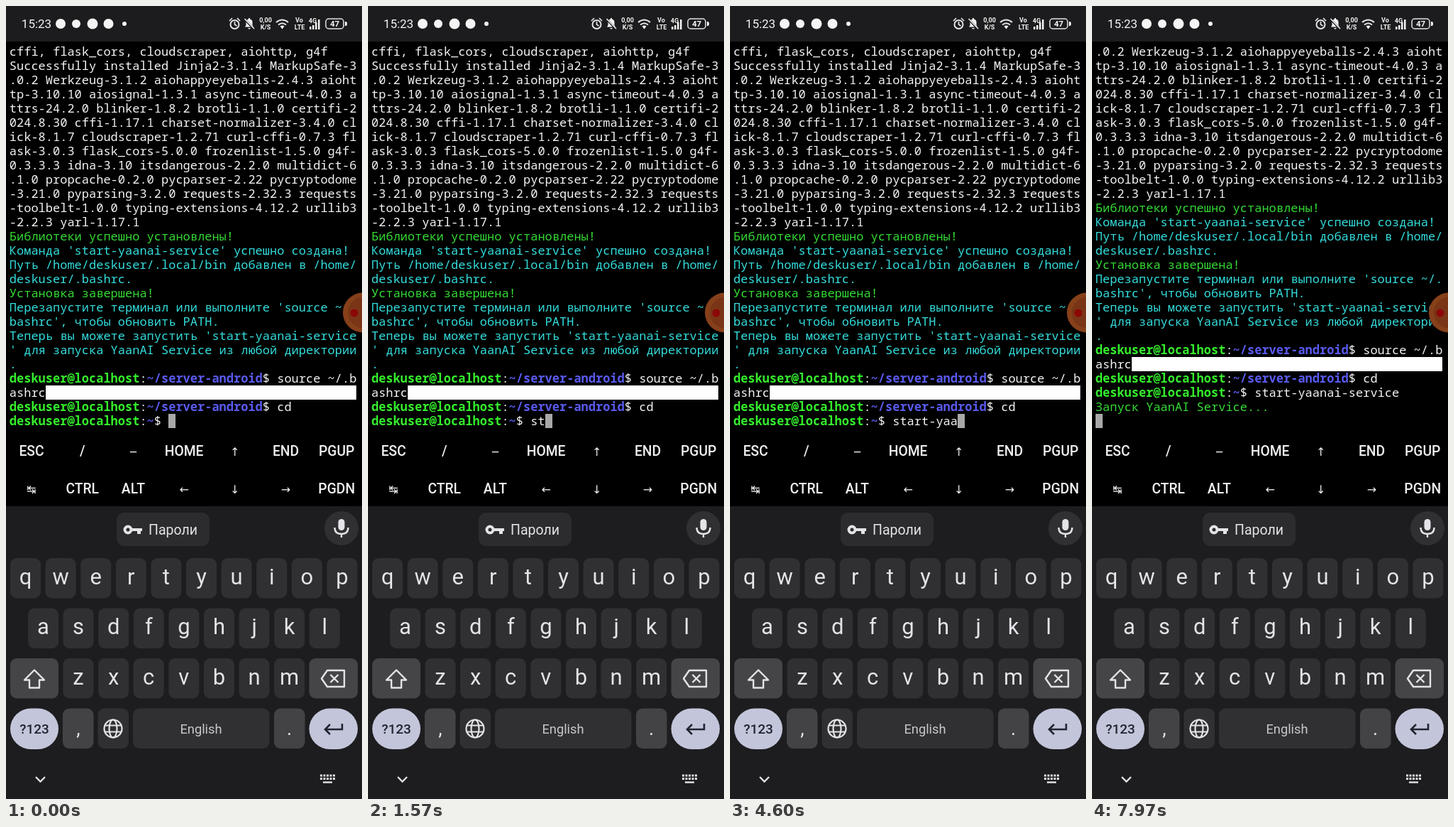
An HTML page for the animation above (8 s loop, 502 px wide and 1116 px high).

```html
<!DOCTYPE html>
<html lang="ru">
<head>
<meta charset="utf-8">
<style>
html, body { margin: 0; width: 100%; height: 100%; overflow: hidden; background: #000; }
svg, pre { position: absolute; left: 0; top: 0; }
svg { font-family: Roboto, sans-serif; fill: #e4e4e8; }
svg text { text-anchor: middle; }
pre { left: 4.8px; top: 53.6px; margin: 0; color: #f4f4f4;
  font: 17px/20px "Noto Sans Mono", monospace; font-variant-ligatures: none; }
pre div { height: 20px; white-space: pre; }
.green { color: #35dc35; }
.cyan { color: #35dede; }
.user { color: #35ee2c; font-weight: 700; }
.path { color: #5a5af0; font-weight: 700; }
.bar, .cursor { display: inline-block; height: 20px; vertical-align: top; background: #fff; }
.cursor { background: #a8a8a8; }
.line { fill: none; stroke: #e4e4e8; stroke-width: 2.4; }
</style>
</head>
<body>
<pre id="term"></pre>
<svg width="502" height="1116" viewBox="0 0 502 1116">
  <rect width="502" height="50" fill="#1c1c1e"/>
  <rect y="704" width="502" height="412" fill="#1d1d20"/>

  <!-- status bar -->
  <g fill="#f4f4f4">
    <text x="43" y="31" font-size="17">15:23</text>
    <circle cx="77" cy="25" r="7"/><circle cx="99" cy="25" r="6"/>
    <circle cx="122" cy="25" r="7.5"/><circle cx="144.500" cy="25" r="7"/>
    <circle cx="167" cy="25" r="3"/>
    <circle cx="322.500" cy="26" r="6" class="line" style="stroke-width:2"/>
    <path d="M322.500 22v4l3 2M315 21l4-4M330 21l-4-4" class="line" style="stroke-width:1.7"/>
    <path d="M337 29.500h12l-1.500-2.500v-4q0-4-3.500-4.500v-1.500h-2v1.500q-3.500 .5-3.500 4.500v4zM341 31h4q-2 3-4 0z"/>
    <path d="M336 18l14 15" stroke="#1c1c1e" stroke-width="3"/>
    <path d="M336.500 18l13.500 14" stroke="#f4f4f4" stroke-width="1.500"/>
    <g font-size="9" font-weight="700">
      <text x="366" y="23">0,00</text><text x="366" y="33">K/S</text>
      <text x="413.500" y="23">Vo</text><text x="414" y="33">LTE</text>
      <text x="432.500" y="24">4G</text>
    </g>
    <path d="M381 23q8.500-7 17 0M384 26.500q5.500-4.500 11 0" class="line" style="stroke-width:2"/>
    <path d="M386.500 28.500q3-2 6 0l-3 4z"/>
    <path d="M428 29h2.500v4h-2.500zM432 27h2.500v6h-2.500zM436 23h2.500v10h-2.500zM440 19h2.500v14h-2.500z"/>
    <rect x="451" y="18" width="25" height="14" rx="4" class="line" style="stroke-width:1.500"/>
    <path d="M478 22h1q2 0 2 3t-2 3h-1z"/>
    <text x="463.500" y="29.300" font-size="11.500" font-weight="700">47</text>
  </g>

  <g id="extra" font-size="19.300" font-weight="500" fill="#f0f0f0"></g>
  <g id="keys"></g>

  <!-- suggestion strip -->
  <rect x="156" y="713" width="131" height="47" rx="11" fill="#2c2c2f"/>
  <circle cx="172" cy="737" r="4.500" class="line" style="stroke-width:4"/>
  <path d="M177 735h15v4h-2v4h-5v-4h-8z"/>
  <text x="235.500" y="744" font-size="19.500">Пароли</text>
  <circle cx="473" cy="735" r="24" fill="#303033"/>
  <rect x="468.500" y="722" width="9" height="16" rx="4.500"/>
  <path d="M463.500 734q0 9 9.500 9t9.500-9M473 743v5" class="line"/>

  <!-- key icons -->
  <path d="M40 934.500l14 14h-7v11h-14v-11h-7z" class="line" stroke-linejoin="round"/>
  <path d="M453 935h24v23h-24l-8-11.500zM457.500 941l11 11m0-11l-11 11" class="line" stroke-linejoin="round"/>
  <g class="line" style="stroke-width:2.200">
    <circle cx="151" cy="1017" r="12.500"/><ellipse cx="151" cy="1017" rx="5.500" ry="12.500"/>
    <path d="M140 1012.500h22M140 1021.500h22"/>
  </g>
  <path d="M474 1010v8h-24m7-7l-7 7 7 7" class="line" style="stroke:#202430;stroke-width:2.600"/>
  <path d="M42 1085l6.500 6.500 6.500-6.500" class="line"/>
  <path d="M443 1083h21M443 1087.500h21" class="line" stroke-dasharray="3 1.500" style="stroke-width:3"/>
  <path d="M447 1092.500h13" class="line"/>

  <!-- floating button -->
  <circle cx="503" cy="431.500" r="28" fill="#86401a"/>
  <circle cx="504" cy="431.500" r="22" fill="#7a3516"/>
  <circle cx="491" cy="432" r="5.500" fill="#8c0808"/>
</svg>
<script>
const $ = id => document.getElementById(id);
const COLS = 48, ROWS = 27, LOOP = 8000;
const USER = 'deskuser';
const COMMAND = 'start-yaanai-service ';

// ---- keyboard ----
const label = (x, y, text, size = '', more = '') =>
  `<text x="${x}" y="${y}" ${size && `font-size="${size}"`} ${more}>${text}</text>`;
const key = (x, y, w, fill = '#303033', r = 9, h = 56.5) =>
  `<rect x="${x}" y="${y}" width="${w}" height="${h}" rx="${r}" fill="${fill}"/>`;

let keys = '';
[['qwertyuiop', 27.5, 777], ['asdfghjkl', 52.5, 847.5], ['zxcvbnm', 102, 918]].forEach(([row, x0, y]) =>
  [...row].forEach((ch, i) => {
    const x = x0 + i * 49.6;
    keys += key(x - 21.5, y, 43) + label(x, y + 36.5, ch, 31);
  }));
keys += key(6, 918, 68, '#454548') + key(427.5, 918, 68.5, '#454548')
  + key(6, 988.5, 68, '#c3c6da', 29, 57.5) + key(427.5, 988.5, 68.5, '#c3c6da', 29, 57.5)
  + key(80, 988.5, 43.5, '#434346') + key(129.5, 988.5, 43.5)
  + key(179, 988.5, 192.5) + key(378, 988.5, 43.5, '#434346')
  + label(40, 1023.5, '?123', 19, 'font-weight="500" fill="#202430"')
  + label(102, 1026, ',', 27) + label(399.5, 1026, '.', 27)
  + label(275, 1023.5, 'English', 18.3, 'fill="#c8c8cc"');
$('keys').innerHTML = keys;

const extra = [['ESC', '/', '—', 'HOME', '↑', 'END', 'PGUP'], ['↹', 'CTRL', 'ALT', '←', '↓', '→', 'PGDN']];
$('extra').innerHTML = extra.map((row, r) => row.map((text, i) => {
  const symbol = '↑↓←→↹'.includes(text);
  const style = symbol ? 'font-weight="400" font-family="DejaVu Sans, sans-serif"' : '';
  return label(36 + i * 71.7, 633 + r * 53, text, symbol ? 16 : text === '—' ? 14 : '', style);
}).join('')).join('');

// ---- terminal: a paragraph is a list of [text, class] ----
const prompt = (dir, ...rest) => [[USER + '@localhost', 'user'], [':'], [dir, 'path'], ['$ '], ...rest];
const packages = 'Successfully installed Jinja2-3.1.4 MarkupSafe-3.0.2 Werkzeug-3.1.2 aiohappyeyeballs-2.4.3 '
  + 'aiohttp-3.10.10 aiosignal-1.3.1 async-timeout-4.0.3 attrs-24.2.0 blinker-1.8.2 brotli-1.1.0 '
  + 'certifi-2024.8.30 cffi-1.17.1 charset-normalizer-3.4.0 click-8.1.7 cloudscraper-1.2.71 '
  + 'curl-cffi-0.7.3 flask-3.0.3 flask_cors-5.0.0 frozenlist-1.5.0 g4f-0.3.3.3 idna-3.10 '
  + 'itsdangerous-2.2.0 multidict-6.1.0 propcache-0.2.0 pycparser-2.22 pycryptodome-3.21.0 '
  + 'pyparsing-3.2.0 requests-2.32.3 requests-toolbelt-1.0.0 typing-extensions-4.12.2 urllib3-2.2.3 yarl-1.17.1';
const log = [
  [['cffi, flask_cors, cloudscraper, aiohttp, g4f']],
  [[packages]],
  [['Библиотеки успешно установлены!', 'green']],
  [["Команда 'start-yaanai-service' успешно создана!", 'cyan']],
  [[`Путь /home/${USER}/.local/bin добавлен в /home/${USER}/.bashrc.`, 'cyan']],
  [['Установка завершена!', 'green']],
  [["Перезапустите терминал или выполните 'source ~/.bashrc', чтобы обновить PATH.", 'cyan']],
  [["Теперь вы можете запустить 'start-yaanai-service' для запуска YaanAI Service из любой директории.", 'cyan']],
  prompt('~/server-android', ['source ~/.bashrc'], [' '.repeat(43), 'bar']),
  prompt('~/server-android', ['cd']),
];
const cursor = [' ', 'cursor'];

// Hard wrap at COLS, keeping the colour of each piece.
function wrap(paragraph) {
  const rows = [''];
  let col = 0;
  for (let [text, cls = ''] of paragraph) {
    while (text) {
      if (col === COLS) { rows.push(''); col = 0; }
      const part = text.slice(0, COLS - col);
      rows[rows.length - 1] += `<span class="${cls}">${part}</span>`;
      col += part.length;
      text = text.slice(part.length);
    }
  }
  return rows;
}

// [time, characters typed]; the last step is the tab completion
const typing = [[760, 1], [1300, 2], [1900, 3], [2150, 4], [2450, 5], [3200, 6],
  [3650, 7], [4000, 8], [4400, 9], [4750, 10], [5150, COMMAND.length]];
const ENTER = 5900, REPLY = 5980;

function screen(t) {
  const typed = typing.reduce((n, [at, count]) => t >= at ? count : n, 0);
  const line = [COMMAND.slice(0, typed)];
  if (t < ENTER) return [prompt('~', line, cursor)];
  const reply = [['Запуск YaanAI Service...', 'green']];
  return [prompt('~', line), ...(t < REPLY ? [] : [reply]), [cursor]];
}

const history = log.flatMap(wrap);
let shown = '';
function draw(now) {
  const rows = history.concat(screen(now % LOOP).flatMap(wrap)).slice(-ROWS);
  const html = rows.map(row => `<div>${row}</div>`).join('');
  if (html !== shown) $('term').innerHTML = shown = html;
}

const start = performance.now();
(function tick() {
  draw(performance.now() - start);
  requestAnimationFrame(tick);
})();
</script>
</body>
</html>
```
